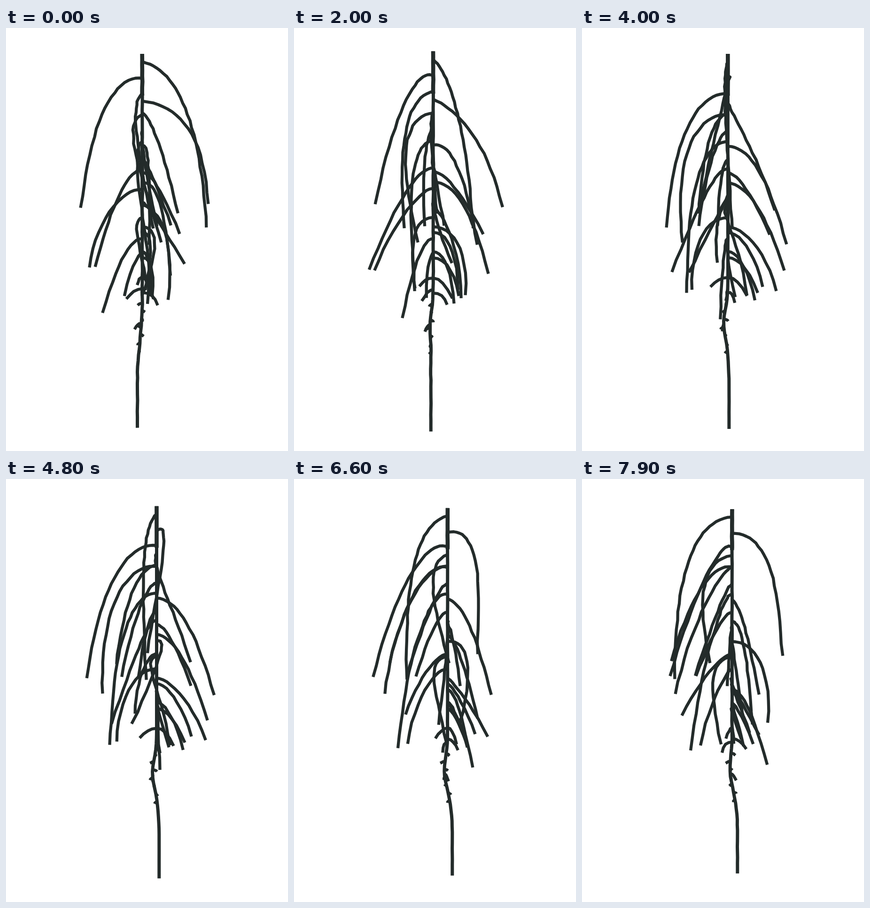
Write an HTML page with a canvas that moves like this. It is 600x900 px and loops after 8000 ms.

```html
<!DOCTYPE html>
<html lang="en">
<head>
<meta charset="utf-8">
<title>Turning plant</title>
<style>
  html, body { margin: 0; width: 100%; height: 100%; overflow: hidden; background: #fff; }
  canvas { display: block; }
</style>
</head>
<body>
<canvas id="stage" width="600" height="900"></canvas>
<script>
const ctx = document.getElementById('stage').getContext('2d');
const LOOP = 8000, STEP = 100, MID = 450.5, DEPTH = 900;
const RAD = Math.PI / 180, SPIN = 18 * RAD; // turn per second

// Sideways drift of the stem and camera scale at a few moments
const moments = [0, 1200, 2000, 3200, 4800, 6600, 7900];
const drift = [290, 294, 296.3, 300, 320.5, 326.7, 319.2];
const zoom = [0.9875, 0.9975, 1.001, 0.994, 0.98, 0.97, 0.964];

function keyed(values, t) {
  const last = moments.length - 1;
  const slope = i => {
    const a = Math.max(0, i - 1), b = Math.min(last, i + 1);
    return (values[b] - values[a]) / (moments[b] - moments[a]);
  };
  let i = 0;
  while (i < last - 1 && t > moments[i + 1]) i++;
  const span = moments[i + 1] - moments[i];
  const u = (t - moments[i]) / span, v = u * u, w = v * u;
  return (2 * w - 3 * v + 1) * values[i] + (3 * v - 2 * w) * values[i + 1]
    + span * ((w - 2 * v + u) * slope(i) + (w - v) * slope(i + 1));
}

let seed = 11;
function wobble(size) {
  seed = (seed * 16807) % 2147483647;
  return (seed / 2147483647 * 2 - 1) * size;
}

function ease(from, to, v) {
  const u = Math.min(1, Math.max(0, (v - from) / (to - from)));
  return u * u * (3 - 2 * u);
}

// The stem is straight at the top and bends below the lowest shoots
function stemAt(y) {
  const kink = Math.exp(-(((y - 628) / 40) ** 2));
  return [-10.5 * ease(590, 750, y), y, 6 * ease(640, 760, y) - 9 * kink];
}

const strokes = [];
function stemPart(from, to, width) {
  const path = [];
  for (let y = from; y <= to; y += 12) {
    const [x, , z] = stemAt(y);
    path.push([x + wobble(0.5), y, z]);
  }
  path.push(stemAt(to));
  strokes.push({ path, width });
}

// An arc that leaves the stem at y and droops to the height tip;
// its heading turns by twist degrees on the way, bend sets how far it bulges out.
function limb(y, tip, reach, heading, twist = 30, bend = 0.55) {
  const [sx, , sz] = stemAt(y), drop = tip - y;
  const parts = Math.max(4, Math.round(Math.hypot(drop, reach) / 14));
  const path = [];
  for (let i = 0; i <= parts; i++) {
    const u = i / parts;
    const r = reach * (2 * u * (1 - u) * bend + u * u);
    const a = (heading - twist * (1 - u)) * RAD;
    const shake = i ? 1 : 0;
    path.push([sx + r * Math.cos(a) + wobble(shake), y + drop * u * u, sz + r * Math.sin(a) + wobble(shake)]);
  }
  strokes.push({ path, width: 6.3 });
}

// Crown
limb(67, 423, 148, -14, 14, 0.9);
limb(103, 381, 134, 184, 34, 0.7);
limb(135, 422, 162, -80, 36, 0.62);
limb(152, 380, 150, 30, 45, 0.76);
limb(177, 387, 133, -50, 15);
limb(181, 457, 136, -70, 60, 0.76);
limb(217, 419, 89, -67, 33, 0.32);
limb(239, 572, 109, -77, 40, 0.76);

// Middle
limb(249, 460, 125, 84, 9);
limb(278, 418, 80, -35, 20, 0.3);
limb(298, 514, 137, 216, 14, 0.36);
limb(306, 439, 106, 46, 0, 0.34);
limb(328, 518, 124, 65, 16);
limb(342, 513, 126, 198, 52);
limb(370, 506, 113, -31, 30, 0.3);
limb(376, 576, 61, 27, 78, 1.05);

// Lower shoots
limb(403, 563, 91, -82, 38, 0.76);
limb(423, 557, 106, 90, 54);
limb(435, 550, 76, 86, 42);
limb(448, 606, 85, 172, -4, 0.46);
limb(476, 580, 59, 80);
limb(478, 568, 47, 143, -26, 0.25);
limb(489, 565, 65, 72);
limb(532, 552, 38, 252, 0);
limb(532, 573, 42, 58, 0);
limb(556, 577, 35, 167, 0);
limb(564, 591, 34, 10, 0, 0.7);

// Buds
limb(632, 645, 16, 176, 0);
for (let i = 0; i < 7; i++) limb(588 + 17 * i, 592 + 17 * i, 11 - i, 170 + 137.5 * i, 0);

stemPart(50, 853, 7);
stemPart(50, 140, 8.6);

function draw(t) {
  const c = Math.cos(SPIN * t / 1000), s = Math.sin(SPIN * t / 1000);
  const cx = keyed(drift, t), scale = keyed(zoom, t);
  ctx.fillStyle = '#fff';
  ctx.fillRect(0, 0, 600, 900);
  ctx.strokeStyle = '#232b2a';
  ctx.lineJoin = 'round';
  for (const { path, width } of strokes) {
    ctx.lineWidth = width;
    ctx.beginPath();
    for (const [x, y, z] of path) {
      const k = scale / (1 - (z * c - x * s) / DEPTH);
      ctx.lineTo(cx + (x * c + z * s) * k, MID + (y - MID) * k);
    }
    ctx.stroke();
  }
}

function tick() {
  draw(Math.floor(performance.now() % LOOP / STEP) * STEP);
  requestAnimationFrame(tick);
}
tick();
</script>
</body>
</html>
```
